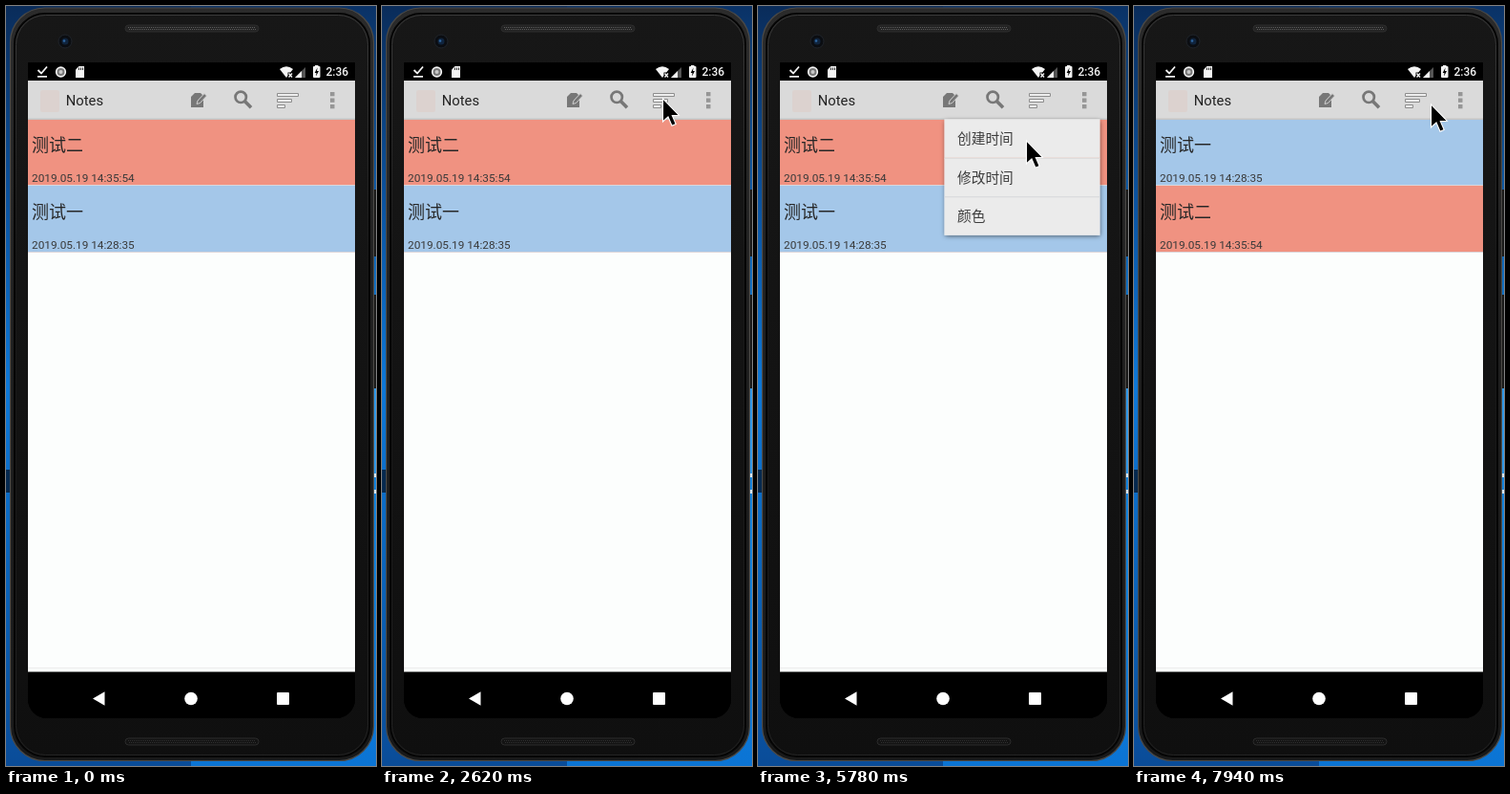
Animation, 388 px wide and 795 px high, one loop 8 s. Source, as an HTML page with a canvas:

```html
<!DOCTYPE html>
<html lang="zh-CN">
<head>
<meta charset="utf-8">
<title>Notes</title>
<style>
html, body { margin: 0; width: 100%; height: 100%; overflow: hidden; background: #111; }
canvas { display: block; width: 388px; height: 795px; }
</style>
</head>
<body>
<canvas id="stage" width="388" height="795"></canvas>
<script>
const LOOP = 8000;
const STEP = 77.5;
const OPEN = 3540, CLOSE = 6390, SWAP = 6470;
const CLICKS = [3000, 6090], CLICK_TIME = 150;

const g = document.getElementById('stage').getContext('2d');
const CJK = '"Noto Sans CJK SC", "Noto Sans CJK", sans-serif';
const LATIN = 'Roboto, sans-serif';

const PINK = { color: '#f09281', title: '测试二', date: '2019.05.19 14:35:54' };
const BLUE = { color: '#a4c7e9', title: '测试一', date: '2019.05.19 14:28:35' };
const ITEMS = ['创建时间', '修改时间', '颜色'];

// Each move runs straight from where the previous one ended
const ENTRY = { x: 332, y: 795 };
const MOVES = [
  { start: 370, end: 1000, x: 225, y: 269 },
  { start: 1070, end: 1150, x: 202, y: 305 },
  { start: 1210, end: 1600, x: 91, y: 200 },
  { start: 1680, end: 1910, x: 114, y: 158 },
  { start: 2080, end: 2160, x: 128, y: 227 },
  { start: 2310, end: 2620, x: 294, y: 96 },
  { start: 3920, end: 4770, x: 287, y: 202 },
  { start: 5000, end: 5470, x: 281, y: 140 },
  { start: 6930, end: 7160, x: 205, y: 143 },
  { start: 7240, end: 7390, x: 139, y: 239 },
  { start: 7560, end: 7940, x: 311, y: 102 }
];

function fillRect(x, y, w, h, color) {
  g.fillStyle = color;
  g.fillRect(x, y, w, h);
}

function paint(fill, stroke, line = 1) {
  if (fill) { g.fillStyle = fill; g.fill(); }
  if (stroke) { g.strokeStyle = stroke; g.lineWidth = line; g.stroke(); }
}

function round(x, y, w, h, r, fill, stroke, line) {
  g.beginPath();
  g.roundRect(x, y, w, h, r);
  paint(fill, stroke, line);
}

function circle(x, y, r, fill, stroke, line) {
  g.beginPath();
  g.arc(x, y, r, 0, Math.PI * 2);
  paint(fill, stroke, line);
}

function poly(points, fill, stroke, line) {
  g.beginPath();
  points.forEach(([x, y]) => g.lineTo(x, y));
  g.closePath();
  paint(fill, stroke, line);
}

function stroke(points, color, line) {
  g.beginPath();
  points.forEach(([x, y]) => g.lineTo(x, y));
  paint(null, color, line);
}

function text(str, x, y, font, color) {
  g.font = font;
  g.fillStyle = color;
  g.fillText(str, x, y);
}

// Vertical gradient over the stage, colours evenly spaced
function fade(...colors) {
  const grad = g.createLinearGradient(0, 0, 0, 795);
  colors.forEach((color, i) => grad.addColorStop(i / (colors.length - 1), color));
  return grad;
}

function drawDesktop() {
  fillRect(0, 0, 194, 795, fade('#0a2c5a', '#0a529f', '#0d78d8', '#0a64bb', '#0a4c98'));
  fillRect(0, 485, 6, 24, '#06294f');
  fillRect(194, 0, 194, 795, fade('#0a3266', '#0b5aa8', '#1488e6', '#0e82e0', '#0b74d4'));
  fillRect(385, 400, 3, 90, '#2f9bee');
  for (const y of [489, 506]) fillRect(385, y, 3, 4, '#dceefb');
}

function speaker(y, color, dot) {
  round(125, y, 140, 7, 3.5, color, '#2d2d2d');
  for (let row = 0; row < 2; row++) {
    for (let x = 128 + row; x < 262; x += 2) fillRect(x, y + 2 + row * 2, 1, 1, dot);
  }
}

function drawPhone() {
  fillRect(384, 192, 4, 70, '#171717');
  fillRect(384, 302, 4, 98, '#171717');
  round(4.5, 2, 381, 787.5, 36, fade('#2b2b2b', '#1d1d1d', '#191919'), '#4b4946', 1.2);
  round(9, 8, 372, 777, 32, fade('#171717', '#131313', '#0f0f0f'), '#050505', 2);
  round(10.5, 9.5, 369, 774, 31, null, fade('#3c3c3c', '#191919', '#191919', '#242424'));
  speaker(20, '#232323', '#5c5c5c');
  speaker(766, '#131313', '#303030');
  circle(62, 37, 7, '#0b0d11', '#20242a');
  circle(62, 37, 3.5, '#10243d');
  circle(61, 36.5, 1.3, '#2e67a2');
  round(23, 59, 343, 686, [0, 0, 20, 20], '#000');
}

function drawStatus() {
  const white = '#f4f4f4';
  stroke([[33.5, 67], [37, 70.5], [43, 63.5]], white, 1.8);
  fillRect(33, 73, 10, 1.7, white);
  circle(57.5, 69, 4.8, '#777', white, 1.7);
  circle(57.5, 69, 2, '#c8c8c8');
  poly([[76.5, 63], [82, 63], [82, 75], [73, 75], [73, 66.5]], white);
  for (let x = 76; x < 82; x += 2) fillRect(x, 64.5, 1, 2.5, '#333');

  g.beginPath();
  g.moveTo(294, 75);
  g.lineTo(287, 66);
  g.quadraticCurveTo(294, 60.5, 301, 66);
  paint(white);
  fillRect(295.5, 69.5, 6, 6, '#000');
  stroke([[296.5, 70.5], [300, 74.5]], white, 1.3);
  stroke([[300, 70.5], [296.5, 74.5]], white, 1.3);
  poly([[303, 75], [314, 75], [314, 64]], '#555');
  poly([[303, 75], [310, 75], [310, 68]], white);
  fillRect(324, 62, 3.5, 2, white);
  round(322, 63, 7.5, 12, 1, white);
  poly([[326.5, 64.5], [323.7, 70], [325.5, 70], [325, 73.5], [328, 68], [326, 68]], '#000');
  text('2:36', 335.5, 73.3, '500 12px ' + LATIN, white);
}

function drawToolbar() {
  const gray = '#777', bar = '#dadada';
  fillRect(23, 78, 343, 40, bar);
  fillRect(23, 117.5, 343, 1.5, '#c5c5c5');
  round(36, 88, 20, 23, 2, '#dcd2cf');
  text('Notes', 62.7, 104.3, '14.8px ' + LATIN, '#222');

  poly([[194, 95], [198, 91], [204, 91], [207, 94], [207, 106], [194, 106]], gray);
  poly([[200, 102.5], [201, 99], [208, 91.5], [210.5, 94], [203.5, 101.5]], gray, bar, 0.9);
  circle(246.2, 95.3, 5.7, null, gray, 2.7);
  stroke([[250.3, 99.5], [257, 106.3]], gray, 3.6);
  for (let i = 0; i < 3; i++) {
    g.beginPath();
    g.rect(284.5, 91.5 + i * 6, 22 - i * 7, 3);
    paint('#eee', '#8d8d8d');
    fillRect(340, 90 + i * 6.5, 4.5, 4.3, '#969696');
  }
}

function drawList(rows) {
  fillRect(23, 118, 343, 579, '#fcfefd');
  rows.forEach((row, i) => {
    const y = 118 + i * 70;
    fillRect(23, y, 343, 69, row.color);
    fillRect(23, y + 69, 343, 1, '#dcd6da');
    text(row.title, 27, y + 34.2, '18px ' + CJK, '#262626');
    text(row.date, 27, y + 66.1, '11.8px ' + LATIN, '#393939');
  });
  fillRect(23, 692, 343, 1, '#ececec');
}

function drawNav() {
  round(23, 696.5, 343, 48.5, [0, 0, 20, 20], '#000');
  poly([[91, 724.5], [103.5, 717.3], [103.5, 731.7]], '#fff');
  circle(194, 724.5, 6.8, '#fff');
  round(284, 718, 13, 13, 1, '#fff');
}

// Shadow is kept outside the box so a translucent menu stays bright
function menuShadow(w, h) {
  g.save();
  g.beginPath();
  g.rect(-w, -20, w * 2, h + 40);
  g.rect(-w / 2, 0, w, h);
  g.clip('evenodd');
  g.shadowColor = 'rgba(0,0,0,.6)';
  g.shadowBlur = 5;
  g.shadowOffsetY = 1.5;
  fillRect(-w / 2, 0, w, h, '#ebebeb');
  g.restore();
}

// Menu grows from 90% while fading in
function drawMenu(p, pressed) {
  if (!p) return;
  const w = 163, row = 40.5, left = -w / 2;
  g.save();
  g.globalAlpha = p;
  g.translate(277, 118.3);
  g.scale(0.9 + 0.1 * p, 0.9 + 0.1 * p);
  menuShadow(w, row * 3);
  ITEMS.forEach((item, i) => {
    const y = i * row;
    fillRect(left, y, w, row, pressed && !i ? '#d3d3d3' : '#ebebeb');
    if (i) fillRect(left, y, w, 1, '#dadada');
    text(item, left + 13.5, y + 26, '14.7px ' + CJK, '#3d3d3d');
  });
  g.restore();
}

function stepsSince(start, t) {
  return Math.floor((t - start + 5) / STEP) + 1;
}

function pointerAt(t) {
  const i = MOVES.findLastIndex(m => t >= m.start);
  if (i < 0) return null;
  const to = MOVES[i], from = MOVES[i - 1] || ENTRY;
  const u = Math.min(1, stepsSince(to.start, t) / stepsSince(to.start, to.end));
  const mix = key => Math.round(from[key] + (to[key] - from[key]) * u);
  return [mix('x'), mix('y')];
}

function drawPointer([x, y]) {
  g.save();
  g.translate(x, y);
  poly([[0.5, 0.8], [0.5, 25], [6, 20], [10, 29.3], [14.2, 27.5], [10.3, 18.6], [17.3, 18.2]],
    '#000', '#fff', 1.1);
  g.restore();
}

function menuPhase(t) {
  if (t < OPEN || t >= SWAP) return 0;
  if (t >= CLOSE) return 2 / 3;
  return Math.sin(Math.PI / 8 * Math.min(4, stepsSince(OPEN, t)));
}

function draw(t) {
  drawDesktop();
  drawPhone();
  drawStatus();
  drawList(t < SWAP ? [PINK, BLUE] : [BLUE, PINK]);
  drawToolbar();
  drawNav();
  drawMenu(menuPhase(t), t >= CLICKS[1] + STEP);
  const pos = pointerAt(t);
  if (!pos) return;
  if (CLICKS.some(c => t >= c && t < c + CLICK_TIME)) {
    circle(...pos, 14, null, '#000');
    circle(...pos, 13, null, '#fff');
  }
  drawPointer(pos);
}

const begin = performance.now();
function tick() {
  draw((performance.now() - begin) % LOOP);
  requestAnimationFrame(tick);
}
tick();
</script>
</body>
</html>
```
